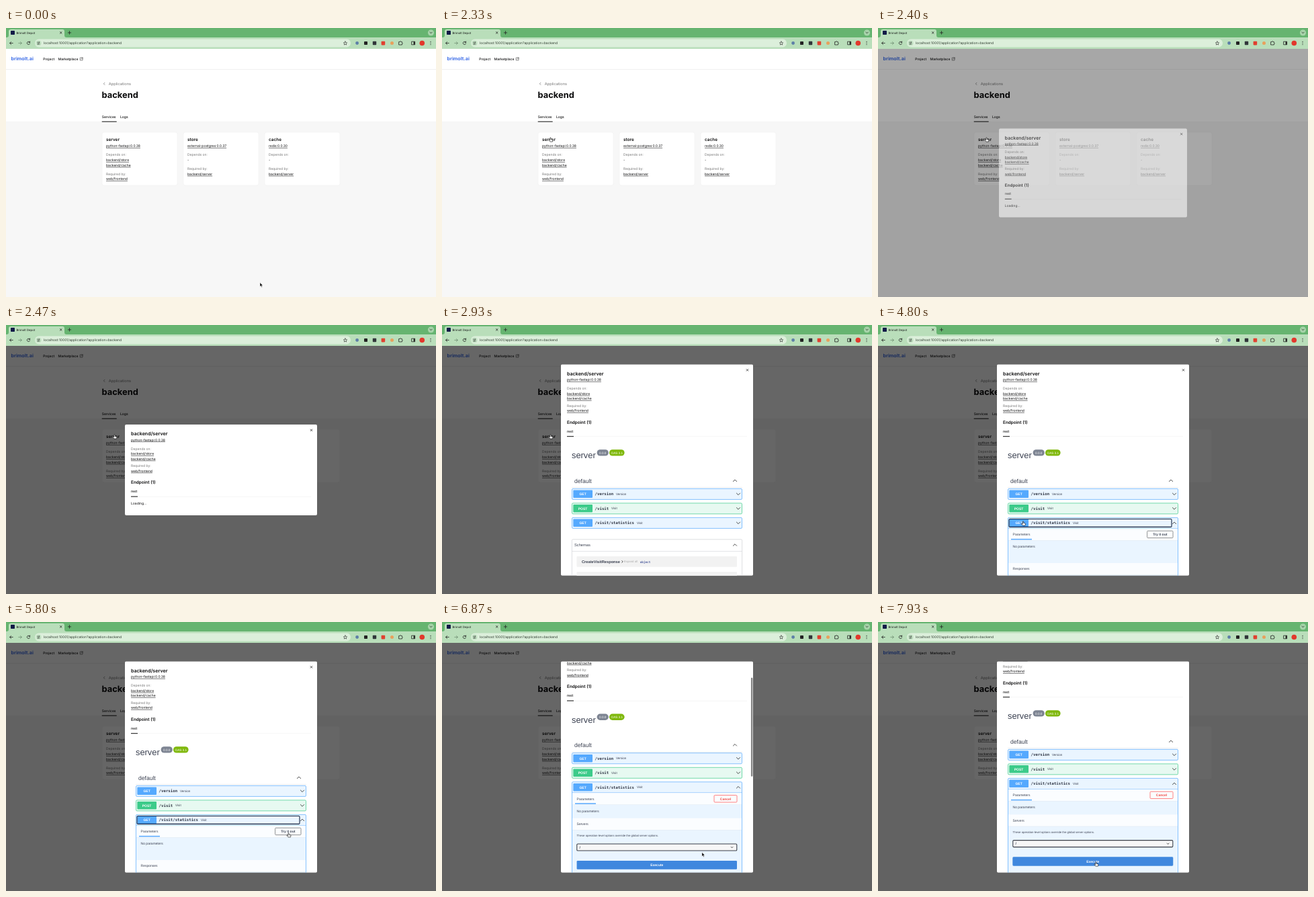
An HTML page for the animation above (8 s loop, 640 by 400 pixels).

```html
<!DOCTYPE html>
<html lang="en">
<head>
<meta charset="utf-8">
<title>Services</title>
<style>
html, body { margin: 0; width: 100%; height: 100%; overflow: hidden; background: #f7f7f7 }
svg { display: block; width: 100%; height: 100%; font-family: Inter, sans-serif; text-rendering: geometricPrecision }
text { fill: #0b0b0c; white-space: pre }
.m { font-weight: 500 } .b { font-weight: 600 } .g { fill: #777 } .u { text-decoration: underline }
.sw { font-family: "Liberation Sans", sans-serif; fill: #3b4151 }
.bold { font-weight: 700 } .mid { text-anchor: middle } .w { fill: #fff }
.mono { font-family: "DejaVu Sans Mono", monospace; font-weight: 700; fill: #303644 }
.line { fill: none; stroke: #222; stroke-width: .8; stroke-linecap: round; stroke-linejoin: round }
</style>
</head>
<body>
<svg id="stage" viewBox="0 0 640 400"></svg>
<script>
const BLUE = '#55a9fe', GREEN = '#3ccb8a';

// Font sizes are in page pixels; the stage shows the page at 1 / 2.8.
const text = (x, y, str, px = 14, cls = '', more = '') =>
  `<text x="${x}" y="${y}" font-size="${px / 2.8}" class="${cls}" ${more}>${str}</text>`;
const rect = (x, y, w, h, fill, r = 0, more = '') =>
  `<rect x="${x}" y="${y}" width="${w}" height="${h}" fill="${fill}" rx="${r}" ${more}/>`;
const disc = (x, y, r, fill) => `<circle cx="${x}" cy="${y}" r="${r}" fill="${fill}"/>`;
const line = (d, more = '') => `<path class="line" d="${d}" ${more}/>`;
const group = (id, body, more = '') => `<g id="${id}" ${more}>${body}</g>`;
const chevron = (x, y, up, w = 2.6) => {
  const h = up ? -w / 2 : w / 2;
  return line(`M${x - w} ${y - h}l${w} ${2 * h}l${w} ${-2 * h}`);
};
const cross = (x, y, r) => line(`M${x - r} ${y - r}l${2 * r} ${2 * r}m0 ${-2 * r}l${-2 * r} ${2 * r}`);

function browser() {
  return rect(0, 0, 640, 31, '#66b470') + rect(0, 14, 640, 17, '#b9deba') +
    `<path d="M1 14q3 0 3-3V5q0-3 3-3h77q3 0 3 3v6q0 3 3 3z" fill="#b9deba"/>` +
    rect(7, 4, 6, 6, '#121b48', .8) + text(15.5, 8.8, 'Brimolt Depot', 12) + cross(81.7, 7, 1.3) +
    line('M92.3 7h4.4m-2.2-2.2v4.4') +
    disc(632.5, 7, 4.6, '#a6d3a9') + chevron(632.5, 7, false, 1.6) +
    line('M10.2 22.5H5.6m2-2l-2 2l2 2') +
    line('M18.8 22.5h4.6m-2-2l2 2l-2 2', 'style="stroke:#6f8f72"') +
    line('M35.4 21.2a2.2 2.2 0 1 0 .2 2m0-3.2v1.6h-1.6') +
    rect(43, 16.5, 470, 12, '#dcefdb', 6) + disc(48.5, 22.5, 4, '#c3e2c4') +
    line('M46.8 21.3h1.6m1.6 2.4h-1.6') + disc(49.6, 21.3, .7, '#222') + disc(47.4, 23.7, .7, '#222') +
    text(56, 24.3, 'localhost:10001/application?application=backend', 14, '', 'style="fill:#2c3a2d"') +
    line('M505 19.9l.8 1.8l1.9.2l-1.4 1.3l.4 1.9l-1.7-1l-1.7 1l.4-1.9l-1.4-1.3l1.9-.2z', 'style="stroke-width:.6"') +
    disc(522.6, 22.5, 2.4, '#5d7fa8') + rect(533, 20, 5, 5, '#222', .8) + rect(545.8, 19.8, 5.4, 5.4, '#30363a', .8) +
    rect(558.6, 19.8, 5.6, 5.6, '#e1402f', .8) + disc(574.5, 22.5, 2.5, '#e8a05c') +
    line('M585 20.6h1.3a.9.9 0 0 1 1.8 0h1.3v1.3a.9.9 0 0 1 0 1.8v1.3h-4.4z') +
    line('M604 20.2h4.6v4.6h-4.6z') + rect(606.6, 20.2, 2, 4.6, '#222') + disc(619.3, 22.5, 3.8, '#e2382c') +
    [20.4, 22.5, 24.6].map(y => disc(632, y, .6, '#222')).join('');
}

function card(x, name, agent, needs, user) {
  const y = 199 + needs.length * 7.5 - 7.5;
  return rect(x, 155, 112, 79, '#fff', 2.5, 'stroke="#ededed" stroke-width=".5"') +
    text(x + 6, 168, name, 18, 'b') + text(x + 6, 177.2, agent, 14, 'u') +
    text(x + 6, 190.3, 'Depends on:', 14, 'g') +
    needs.map((s, i) => text(x + 6, 198.2 + i * 7.6, s, 14, s === '-' ? '' : 'u')).join('') +
    text(x + 6, y + 12.2, 'Required by:', 14, 'g') + text(x + 6, y + 19.8, user, 14, 'u');
}

function page() {
  return rect(0, 31, 640, 369, '#f7f7f7') + rect(0, 31, 640, 108.7, '#fff') +
    rect(0, 61.2, 640, .6, '#e6e6e6') + rect(0, 139.4, 640, .4, '#ececec') +
    text(7.5, 48.3, 'brimolt.ai', 20, 'bold', 'style="fill:#3f6fe8"') +
    text(55.3, 47.9, 'Project', 14, 'm') + text(77.6, 47.9, 'Marketplace', 14, 'm') +
    line('M112 44.2h-1.8v3.8h3.8v-1.8m-1.6-2.2h1.8v1.8m0-1.8l-2.2 2.2', 'style="stroke-width:.5"') +
    line('M146.9 81.3l-1.6 1.6l1.6 1.6', 'style="stroke:#555;stroke-width:.6"') +
    text(152.8, 84.9, 'Applications', 16, 'g') + text(142.6, 104.3, 'backend', 36, 'bold') +
    text(142.7, 133.5, 'Services', 14, 'm') + text(170, 133.5, 'Logs', 14, 'm') + rect(142.7, 138.7, 22, 1, '#111') +
    card(143, 'server', 'python-fastapi:0.0.38', ['backend/store', 'backend/cache'], 'web/frontend') +
    card(264, 'store', 'external-postgres:0.0.37', ['-'], 'backend/server') +
    card(385, 'cache', 'redis:0.0.30', ['-'], 'backend/server');
}

function head() {
  return text(186, 75.1, 'backend/server', 20, 'b') + text(186, 83.2, 'python-fastapi:0.0.38', 14, 'u') +
    text(186, 96.2, 'Depends on:', 14, 'g') + text(186, 103.8, 'backend/store', 14, 'u') +
    text(186, 111.3, 'backend/cache', 14, 'u') + text(186, 121.7, 'Required by:', 14, 'g') +
    text(186, 129.3, 'web/frontend', 14, 'u') + text(186, 147, 'Endpoint (1)', 18, 'b') +
    text(186, 159.7, 'rest', 14, 'm') + rect(186, 165.7, 268, .4, '#e8e8e8') + rect(186, 165.2, 10, 1, '#111') +
    cross(454.5, 67, 1.3);
}

function row(y, verb, color, path, label, h = 16) {
  return rect(193.5, y - 8, 253, h, color, 1.5, `fill-opacity=".12" stroke="${color}" stroke-width=".7"`) +
    rect(195.3, y - 5.8, 28.7, 11.5, color, 1) + text(209.6, y + 1.8, verb, 14, 'sw bold mid w') +
    text(227.6, y + 1.9, path, 16, 'mono') + text(227.6 + path.length * 3.44 + 3.8, y + 1.5, label, 13, 'sw');
}

const bar = (y, label) => rect(194, y, 252, 17.3, '#fff', 0, 'fill-opacity=".8"') +
  rect(194, y + 17.3, 252, .5, '#000', 0, 'opacity=".06"') + text(200.6, y + 10.4, label, 14, 'sw');

const button = (x, w, label, color, ink) =>
  rect(x, 306.2, w, 10.4, 'none', 1.2, `stroke="${color}" stroke-width=".8"`) +
  text(x + w / 2, 313.2, label, 14, 'sw bold mid', `style="fill:${ink}"`);

function schemas() {
  return rect(193.4, 318.8, 253.2, 90, 'none', 1.5, 'stroke="#c6c8cd" stroke-width=".6"') +
    text(197, 328.8, 'Schemas', 16, 'sw') + chevron(436, 327, true) + rect(193.5, 336.2, 253, .5, '#c9cbd0') +
    rect(200.5, 344, 238.5, 15.7, '#f2f2f2', 1) + rect(200.5, 367, 238.5, 15.7, '#f2f2f2', 1) +
    text(208, 353.8, 'CreateVisitResponse', 16, 'sw bold') + line('M267.8 350.5l1.4 1.4l-1.4 1.4') +
    text(271, 353.4, 'Expand all', 12, 'sw', 'style="fill:#aaa"') +
    text(294.8, 353.5, 'object', 12, 'mono', 'style="fill:#4b5a9c"');
}

function docs() {
  const stats = h => row(294.4, 'GET', BLUE, '/visit/statistics', 'Visit', h);
  return text(193, 198.2, 'server', 36, 'sw') +
    rect(230.6, 185.2, 17.2, 9.4, '#7d8492', 4.7) + text(239.2, 191.5, '0.0.0', 13, 'sw mid w') +
    rect(249, 185.2, 22.6, 9.4, '#7fb80c', 4.7) + text(260.3, 191.5, 'OAS 3.1', 13, 'sw mid w') +
    group('hover', rect(193, 221.3, 254, 20.2, '#f3f3f4')) + rect(193, 241.6, 254, .4, '#d5d7da') +
    text(197, 234.5, 'default', 24, 'sw') + chevron(436, 231.4, true) +
    row(251.4, 'GET', BLUE, '/version', 'Version') + chevron(441, 251.4) +
    row(272.9, 'POST', GREEN, '/visit', 'Visit') + chevron(441, 272.9) +
    group('closed', stats(16) + chevron(441, 294.4) + schemas()) +
    group('open', stats(240) + chevron(441, 294.4, true) + rect(193.5, 302.2, 253, .5, BLUE) +
      bar(302.8, 'Parameters') + rect(198, 317.9, 31, 1.5, BLUE) + text(200.6, 331.2, 'No parameters', 14, 'sw') +
      group('ring', rect(195, 288.5, 242, 11.9, 'none', 1.2, 'stroke="#14233f" stroke-width="1.1"')) +
      group('idle', button(400.6, 38.4, 'Try it out', '#777', '#3b4151') + bar(354, 'Responses')) +
      group('edit', button(405, 34, 'Cancel', '#ff6060', '#f04a43') + bar(340.4, 'Servers') +
        text(200.6, 368, 'These operation-level options override the global server options.', 12, 'sw') +
        rect(200.8, 378.6, 238, 10, '#f7f7f7', 1.3, 'stroke="#3b3f48" stroke-width="1.1"') +
        text(204.6, 385.4, '/', 14, 'sw bold') + chevron(431.6, 383.7, false, 1.4) +
        group('glow', rect(200, 403, 239.6, 14, '#9cc4f0', 2)) +
        rect(200.6, 403.6, 238.4, 12.8, '#3f87de', 1.3) + text(319.8, 411.7, 'Execute', 14, 'sw bold mid w')));
}

stage.innerHTML = '<clipPath id="view"><rect x="177" y="58.4" width="286" height="314.4" rx="2"/></clipPath>' +
  page() + group('shade', rect(0, 31, 640, 369, '#000')) + browser() +
  group('small', rect(177, 58.6, 286, 135, '#fff', 2) + head() + text(186, 177.2, 'Loading...')) +
  group('big', rect(177, 58.4, 286, 314.4, '#fff') + group('content', head() + docs()) +
    group('thumb', rect(459.9, 60, 2.5, 147, '#858585', 1.25)), 'clip-path="url(#view)"') +
  group('cursor',
    '<path id="arrow" d="M0 0v6l1.4-1.2l1 2.2l1-.5l-1-2.1h1.8z" fill="#000" stroke="#fff" stroke-width=".5"/>' +
    '<path id="hand" d="M-.7.6a.7.7 0 0 1 1.4 0v1.8l2.1.5q.8.2.7 1L3 6.1H-.5L-2.5 3.9q-.3-.8.5-.9l1.3.8z" fill="#fff" stroke="#000" stroke-width=".6"/>');

// time, x, y, pointing hand; two keys at one time make a jump
const path = [
  [0, 378, 378.5], [70, 378, 378.5], [70, 275, 260], [400, 275, 260], [400, 149, 152], [800, 149, 152],
  [960, 147, 133], [1130, 160, 158], [1470, 160, 158], [1530, 161, 161, 1], [1600, 161.5, 163, 1],
  [3270, 161.5, 163], [3660, 245, 222, 1], [3930, 270.5, 275.8, 1], [4100, 270.5, 275.8, 1],
  [4400, 213, 270.5, 1], [4600, 216, 292, 1], [5050, 216, 292, 1], [5250, 300, 303], [5500, 405, 309, 1],
  [5650, 420.5, 313.8, 1], [6200, 420.5, 313.8, 1], [6300, 418, 318], [6870, 387, 342.5],
  [7350, 345, 352, 1], [7600, 324.5, 357, 1], [8000, 324.5, 357, 1]
];
const el = id => document.getElementById(id);
const fade = (id, v) => el(id).setAttribute('opacity', v);
const show = (id, on) => el(id).setAttribute('display', on ? 'inline' : 'none');
const move = (id, v) => el(id).setAttribute('transform', v);
const ramp = (t, a, b) => Math.min(1, Math.max(0, (t - a) / (b - a)));
const ease = (t, a, b) => { const k = ramp(t, a, b); return k * k * (3 - 2 * k); };

function draw(t) {
  const opening = ramp(t, 2335, 2450), zoom = .95 + .05 * opening;
  fade('shade', .6 * opening);
  show('small', t > 2335 && t < 2670);
  fade('small', opening);
  move('small', `translate(320 215.6) scale(${zoom}) translate(-320 -126.2)`);
  show('big', t >= 2670);

  fade('hover', ramp(t, 3600, 3700) * (1 - ramp(t, 3930, 4130)));
  const open = t >= 4700, edit = t >= 6000;
  show('closed', !open);
  show('open', open);
  show('ring', !edit);
  show('idle', !edit);
  show('edit', edit);
  fade('glow', ramp(t, 7350, 7500));

  const scroll = 48.6 * ease(t, 6350, 6780) + 5.4 * ease(t, 6880, 7150);
  move('content', `translate(0 ${-scroll})`);
  move('thumb', `translate(0 ${scroll * .47})`);
  fade('thumb', ramp(t, 6350, 6420) * (1 - ramp(t, 7500, 7700)));

  const i = path.findLastIndex(k => k[0] <= t), a = path[i], b = path[i + 1];
  const k = ramp(t, a[0], b[0]);
  move('cursor', `translate(${a[1] + (b[1] - a[1]) * k} ${a[2] + (b[2] - a[2]) * k})`);
  show('hand', a[3]);
  show('arrow', !a[3]);
}

function tick() {
  draw(performance.now() % 8000);
  requestAnimationFrame(tick);
}
tick();
</script>
</body>
</html>
```
